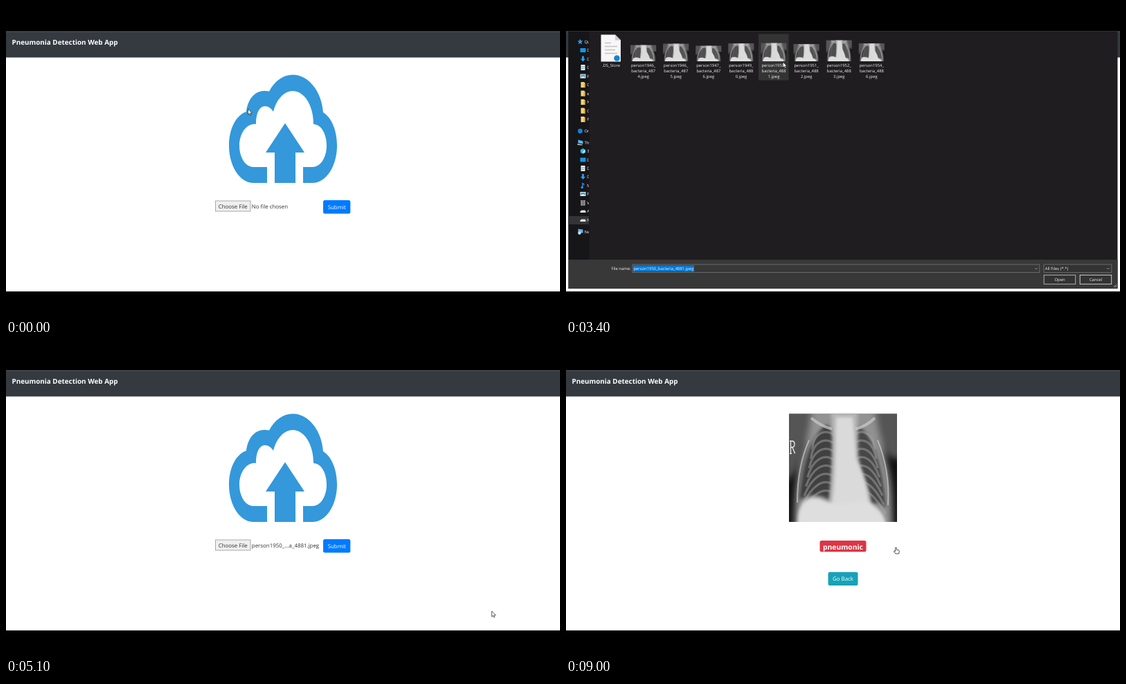
Write an HTML page that moves like this. It is 800 by 450 pixels and loops after 9100 ms.

```html
<!DOCTYPE html>
<html lang="en">
<head>
<meta charset="utf-8">
<title>Pneumonia Detection Web App</title>
<style>
  html, body { margin: 0; width: 100%; height: 100%; overflow: hidden; background: #000; }
  svg { display: block; width: 100vw; height: 100vh; }
  text { font-family: "Open Sans", "Noto Sans", sans-serif; text-rendering: geometricPrecision; }
  .ui { font-size: 7.9px; fill: #333; }
  .small { font-size: 5.9px; fill: #f2f2f2; }
  .mid { text-anchor: middle; }
  .white { fill: #fff; }
</style>
</head>
<body>
<svg id="stage" viewBox="0 0 800 450">
  <defs>
    <filter id="soft"><feGaussianBlur stdDeviation="2"/></filter>
    <filter id="softer"><feGaussianBlur stdDeviation="5"/></filter>
    <clipPath id="sidebarClip"><rect x="4" y="37" width="29" height="330"/></clipPath>
    <symbol id="xray" viewBox="0 0 156 156" preserveAspectRatio="none">
      <rect width="156" height="156" fill="#111"/>
      <g filter="url(#softer)">
        <path fill="#555" d="M-9-9H165V62C150 70 140 60 132 40H24C16 70 10 90-9 100Z"/>
        <path fill="#929292" d="M34-9H124C126 20 136 50 143 80C150 110 148 140 150 165H8C8 130 10 95 18 70C26 45 30 20 34-9Z"/>
      </g>
      <g filter="url(#soft)">
        <path fill="#414141" d="M52 17C32 35 19 70 15 125C24 116 44 114 58 124C62 100 62 60 65 34C62 22 58 14 52 17Z"/>
        <path fill="#474747" d="M100 18C122 30 136 80 140 136C132 128 124 128 118 130C114 100 104 80 98 70C94 45 92 20 100 18Z"/>
      </g>
      <g id="ribs" fill="none" stroke="#aaa" stroke-width="3.2" opacity=".45"></g>
      <g filter="url(#soft)">
        <path fill="#b4b4b4" d="M60-5H99L100 60C104 86 114 100 119 130L58 128C63 90 64 40 60-5Z"/>
        <path fill="#dadada" d="M68 5H92L97 66C110 90 112 108 116 131H62C68 90 67 50 68 5Z"/>
        <path fill="#dedede" d="M13 165C10 130 24 118 44 122C58 128 66 130 78 130C94 130 112 120 122 132C134 140 140 150 140 165Z"/>
      </g>
      <g fill="none" stroke="#ccc" stroke-width="4" opacity=".7">
        <path d="M32 6Q46 18 62 22M124 6Q112 18 96 22"/>
        <path stroke-width="2" d="M29 38Q12 76 12 128M128 38Q146 82 143 132"/>
      </g>
    </symbol>
  </defs>

  <rect width="800" height="450"/>
  <rect y="74" width="800" height="339" fill="#fff"/>
  <rect y="37" width="800" height="37.5" fill="#343a40"/>
  <rect y="36.5" width="800" height="1" fill="#606366"/>
  <text x="8.5" y="55.6" font-size="9.9" font-weight="700" fill="#fff">Pneumonia Detection Web App</text>

  <g id="upload">
    <g fill="#3498db">
      <path d="M377 256H357C338 256 322 232 322 202C322 178 332 158 347 153C349 135 360 119 380 123.5C388 108 401 99.5 414 99.5C437 99.5 456 124 458 154C470 161 478 180 478 202C478 232 462 256 443 256H429V233H443C454 233 463 219 463 202C463 185 455 171 444 171C444 144 431 123 414 123C402 123 391 134 386 153C383 148 379 145 374 145C367 145 361 153 361 171C348 169 337 184 337 202C337 219 346 233 357 233H377Z"/>
      <path d="M403 169.5L431 212H418V256H388V212H375Z"/>
    </g>
    <rect id="choose" x="302.5" y="282" width="50.5" height="15" fill="#efefef" stroke="#aaa"/>
    <text class="ui" x="306.7" y="292.6">Choose File</text>
    <text class="ui" id="chosen" x="354.8" y="292.6"></text>
    <rect id="ring" x="457" y="280" width="41" height="21.5" rx="4" fill="#80bdff"/>
    <rect id="submit" x="458" y="281" width="39.3" height="19.5" rx="2.5"/>
    <text class="ui mid white" x="477.7" y="293.9">Submit</text>
  </g>

  <g id="result">
    <use href="#xray" x="322" y="99.5" width="156" height="156.5"/>
    <path fill="none" stroke="#eee" stroke-width="1.3" d="M324.5 139V157M323 139H327Q330 139.5 330 143.5Q330 148 326.5 148H325M327 148L330.5 157M323 157H326"/>
    <rect x="366.5" y="283" width="67" height="16.2" rx="2.5" fill="#dc3545"/>
    <text class="mid white" x="400" y="295.6" font-size="10.3" font-weight="700">pneumonic</text>
    <rect x="378.5" y="328.5" width="43" height="19.5" rx="2.5" fill="#17a2b8"/>
    <text class="ui mid white" x="400" y="341.3">Go Back</text>
  </g>

  <g id="status">
    <rect x="-.5" y="401.5" width="266.5" height="11.3" fill="#fff" stroke="#ddd" stroke-width=".8"/>
    <text x="2" y="409.4" font-size="5.9" fill="#666">Waiting for 127.0.0.1...</text>
  </g>

  <g id="dialog">
    <rect x="3.5" y="37" width="793" height="372" fill="#1f1d1f"/>
    <rect x="3.5" y="37" width="30" height="330" fill="#161518"/>
    <rect x="3.5" y="304" width="29.5" height="12" fill="#343335"/>
    <rect x="3.5" y="367" width="793" height="42" fill="#383838"/>
    <g id="labels" clip-path="url(#sidebarClip)"></g>
    <rect id="highlight" x="278" y="40.5" width="43.5" height="67" fill="#353435"/>
    <g id="files"></g>
    <rect x="690" y="374" width="97.8" height="11.5" fill="#333" stroke="#777" stroke-width=".8"/>
    <text class="small" x="691.8" y="382">All Files (*.*)</text>
    <path d="M781 379L783 381L785 379" fill="none" stroke="#aaa" stroke-width=".7"/>
    <g id="loading"><rect x="96" y="374" width="588" height="12" fill="#fff"/></g>
    <g id="loaded">
      <text class="small" x="65.5" y="382">File name:</text>
      <rect x="96" y="374" width="587.8" height="11.5" fill="#383838" stroke="#777" stroke-width=".8"/>
      <path d="M677 379L679 381L681 379" fill="none" stroke="#aaa" stroke-width=".7"/>
      <g id="fileName">
        <rect x="97" y="375.3" width="88" height="9" fill="#0078d7"/>
        <text class="small" x="97.4" y="382">person1950_bacteria_4881.jpeg</text>
      </g>
      <rect id="open" x="690.2" y="389.3" width="45.5" height="13" stroke="#bbb" stroke-width=".9"/>
      <text class="small mid" x="713" y="398">Open</text>
      <rect x="742.2" y="389.3" width="45.5" height="13" fill="#333" stroke="#ddd" stroke-width=".9"/>
      <text class="small mid" x="765" y="398">Cancel</text>
      <path d="M791 407L795 403M793.2 407L795 405.2" stroke="#bbb" stroke-width=".9"/>
    </g>
  </g>

  <path id="arrow" fill="#fff" stroke="#222" stroke-width=".7" d="M0 0V8.2L1.9 6.5L3.1 9.2L4.4 8.6L3.2 6H5.8Z"/>
  <path id="hand" fill="#fff" stroke="#222" stroke-width=".8" stroke-linejoin="round" d="M-.9 6V.8Q0-.4 .9 .8V3.7L4.1 4.5Q5 4.8 4.8 6L4.1 9.5H-.5L-3 6.3Q-2.8 5-1.7 5.5Z"/>
</svg>

<script>
const el = id => document.getElementById(id);
const show = (id, on) => el(id).style.display = on ? "" : "none";

// Small sidebar icons, drawn around their centre
const icons = {
  doc: '<path fill="#f4f4f4" d="M-3-4H1L3-2V4H-3Z"/>',
  note: '<path fill="#eee" d="M-3-4H3V4H-3Z"/><path stroke="#4799c9" d="M-2-1H2M-2 1.5H1"/>',
  screen: '<path fill="#1595e6" d="M-4-3H4V3H-4Z"/>',
  down: '<path fill="#2a9df4" d="M-1.4-4H1.4V0H3.5L0 4L-3.5 0H-1.4Z"/>',
  picture: '<path fill="#eee" d="M-4-3H4V3H-4Z"/><path fill="#3a9bd0" d="M-3-2H3V2L0 0L-3 2Z"/>',
  folder: '<path fill="#f6d477" d="M-3-4H2V-3H3V4H-3Z"/><path fill="#d9ac45" d="M1-2H3V4H1Z"/>',
  star: '<path fill="#2d9bea" d="M0-4L1.2-1.2L4-1L1.8 .8L2.6 4L0 2.2L-2.6 4L-1.8 .8L-4-1L-1.2-1.2Z"/>',
  dot: '<circle r="3.4" fill="#1483d8"/>',
  computer: '<path fill="#58b5ea" d="M-3-4L4-2V2L-3 1Z"/><path fill="#ddd" d="M-4 2L3 3V4L-4 3.5Z"/>',
  cube: '<path fill="#35b7e5" d="M0-4L3.6-2V2L0 4L-3.6 2V-2Z"/><path fill="#bfeaf8" d="M0 0L3-1.7V1.6L0 3Z"/>',
  music: '<path fill="none" stroke="#2a9df4" stroke-width="1.3" d="M-.5 2.6V-3.5L2-1.5"/><circle cx="-1.4" cy="2.5" r="1.6" fill="#2a9df4"/>',
  video: '<path fill="#777" d="M-3-4H3V4H-3Z"/><path stroke="#ddd" stroke-dasharray="1 1" d="M-2.5-4V4M2.5-4V4"/>',
  drive: '<path fill="#ddd" d="M-4 0L-2-1.6H3L4 0V2H-4Z"/>',
  network: '<path fill="#58b5ea" d="M-3-4L4-3V2L-3 1Z"/><circle cx="-1" cy="2" r="2.2" fill="#ddd"/>',
};
// label, y, icon once loaded, icon while loading, label x
const rows = [
  ["Quick", 51.5, "star", "", 26.5],
  ["Desktop", 64, "screen", "doc"], ["Downloads", 76.5, "down", "doc"],
  ["Documents", 89, "note", "doc"], ["Pictures", 101.5, "picture", "doc"],
  ["C", 114, "folder", "doc"], ["e", 126.5, "folder", "doc"], ["N", 139, "folder", "doc"],
  ["C", 151.5, "folder", "doc"], ["P", 164, "folder", "doc"],
  ["One", 181, "dot", "", 26.5], ["This", 197.5, "computer", "", 26.5],
  ["3D", 210, "cube", ""], ["Desktop", 222.5, "screen", "screen"],
  ["Documents", 235, "note", "note"], ["Downloads", 247, "down", "down"],
  ["Music", 260, "music", ""], ["Pictures", 272, "picture", "picture"],
  ["Videos", 285, "video", ""], ["A", 297, "drive", "doc"],
  ["N", 310, "drive", "doc"], ["Network", 326.5, "network", "", 26.5],
];
const iconAt = (kind, x, y) => kind ? `<g transform="translate(${x} ${y})">${icons[kind]}</g>` : "";
for (const [label, y, loaded, loading, x = 30.3] of rows) {
  const iconX = x < 30 ? 20.5 : 24.5;
  el("labels").innerHTML += `<text class="small" x="${x}" y="${y + 2}">${label}</text>`;
  el("loaded").innerHTML += iconAt(loaded, iconX, y);
  el("loading").innerHTML += iconAt(loading, iconX, y);
}

// number, suffix, thumbnail top
const scans = [
  [1946, 4874, 56.5], [1946, 4875, 54.5], [1947, 4876, 57.5], [1949, 4880, 54],
  [1950, 4881, 53.5], [1951, 4882, 55], [1952, 4883, 49.5], [1954, 4886, 54],
];
const caption = (lines, x) => lines.map((line, i) =>
  `<text class="small mid" x="${x}" y="${88 + i * 8.2}">${line}</text>`).join("");
el("files").innerHTML = `
  <path fill="#f7f7f7" d="M50.5 41.5H71L79 49.5V80.5H50.5Z"/>
  <path fill="#ccc" d="M71 41.5V49.5H79Z"/>
  <path stroke="#c4c4c4" stroke-width="1.7" d="M56 53.5H65M56 58.5H74M56 63.5H71M56 68.5H74"/>
  <circle cx="73.5" cy="75.5" r="4.3" fill="#1686cf"/>` + caption([".DS_Store"], 65) +
  scans.map(([person, scan, top], i) => {
    const x = 111.7 + i * 47.1;
    return `<use href="#xray" x="${x - 18.7}" y="${top}" width="37.2" height="${80 - top}"/>` +
      caption([`person${person}_`, `bacteria_${String(scan).slice(0, 3)}`, `${scan % 10}.jpeg`], x);
  }).join("");

for (let i = 0; i < 8; i++) {
  const y = 30 + i * 12;
  const out = 22 + i * 1.2;
  el("ribs").innerHTML += `<path d="M64 ${y}C50 ${y - 9} 34 ${y} ${34 - i * 2.4} ${y + out}
    M95 ${y}C108 ${y - 9} 122 ${y} ${124 + i * 2.2} ${y + out}"/>`;
}

// time, x, y of the pointer tip
const path = [
  [300, 349.5, 149], [1100, 330.5, 289], [2000, 330.5, 289], [2200, 329.5, 201],
  [2800, 299, 70], [3300, 299, 70], [4200, 713.5, 391], [4900, 713.5, 391],
  [5100, 701.5, 385], [5200, 522, 311], [5700, 476.5, 292.5], [9100, 476.5, 292.5],
];
function pointerAt(t) {
  const next = path.findIndex(p => p[0] > t);
  if (next === 0) return path[0].slice(1);
  const [t0, x0, y0] = path[next - 1], [t1, x1, y1] = path[next];
  const u = (t - t0) / (t1 - t0);
  const k = t1 - t0 > 300 ? u * u * (3 - 2 * u) : u;
  return [x0 + (x1 - x0) * k, y0 + (y1 - y0) * k];
}

function draw(t) {
  const [x, y] = pointerAt(t);
  const picked = t >= 5000, clicked = t >= 6000, done = t >= 6900;
  const overSubmit = t >= 5500;
  show("upload", !done);
  show("result", done);
  show("status", t >= 6100 && t < 7200);
  show("dialog", t >= 2200 && t < 5000);
  show("loading", t < 2300);
  show("loaded", t >= 2300);
  show("highlight", t >= 2700);
  show("fileName", t >= 3100);
  show("ring", clicked);
  el("open").setAttribute("fill", t >= 4100 ? "#666" : "#333");
  el("choose").setAttribute("stroke", t >= 1000 && t < 2200 ? "#777" : "#aaa");
  el("chosen").textContent = picked ? "person1950_...a_4881.jpeg" : "No file chosen";
  el("submit").setAttribute("fill", clicked ? "#0062cc" : overSubmit ? "#0069d9" : "#007bff");
  show("arrow", !overSubmit);
  show("hand", overSubmit);
  for (const id of ["arrow", "hand"]) el(id).setAttribute("transform", `translate(${x} ${y})`);
}

const LOOP = 9100, STEP = 100;
const start = performance.now();
function tick() {
  const t = (performance.now() - start) % LOOP;
  draw(Math.floor(t / STEP) * STEP);
  requestAnimationFrame(tick);
}
tick();
</script>
</body>
</html>
```
